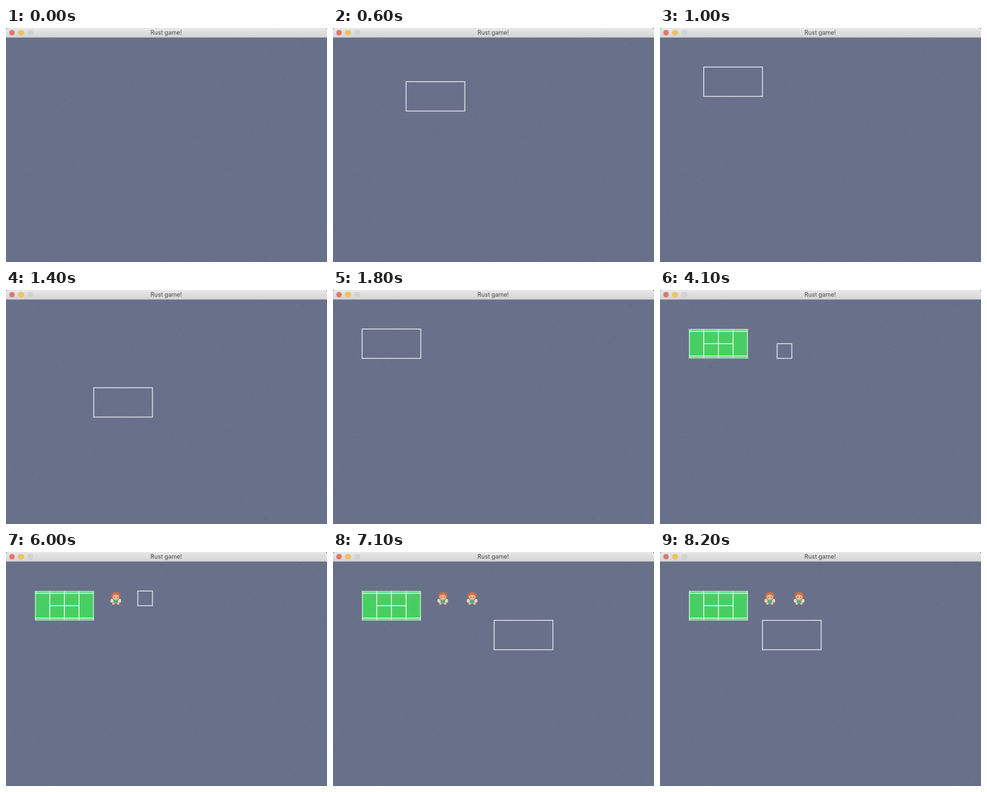
Animation of 480 by 350 pixels, one loop 8300 ms. Source, as an HTML page with a canvas:

```html
<!DOCTYPE html>
<html lang="en">
<head>
<meta charset="utf-8">
<title>Rust game!</title>
<style>
  html, body { margin: 0; width: 100%; height: 100%; overflow: hidden; background: #69718a; }
  #win { position: relative; width: 480px; height: 350px; overflow: hidden; }
  canvas { position: absolute; left: 0; top: 0; }
  #bar {
    position: absolute; left: 0; top: 0; width: 480px; height: 15px; box-sizing: border-box;
    background: linear-gradient(#e8e8e8, #d4d4d4); border-bottom: 1px solid #878b98;
    border-radius: 3px 3px 0 0;
    font: 8.9px/14px Inter, "Open Sans", sans-serif; color: #4a4a4a; text-align: center; text-indent: -1px;
  }
  #bar i {
    position: absolute; top: 2.7px; left: calc(4.7px + 13.7px * var(--n));
    width: 8.6px; height: 8.6px; border-radius: 50%;
  }
</style>
</head>
<body>
<div id="win">
  <canvas id="stage" width="480" height="350"></canvas>
  <div id="bar">
    <i style="--n:0;background:#e3766b"></i>
    <i style="--n:1;background:#edc25f"></i>
    <i style="--n:2;background:#d2d2d2"></i>
    Rust game!
  </div>
</div>
<script>
const LOOP = 8300, STEP = 100;
const CELL = 21.94, LEFT = 43.5, TOP = 58.4;
const ctx = document.getElementById('stage').getContext('2d');

// Each cursor visits stops: arrival time, column, row, glide time (none = jump)
const cursors = [
  { w: 4, h: 2, end: 2300, stops: [[200, 4, 2], [800, 0, 0, 300], [1000, 1, 0], [1400, 4, 4, 400], [1800, 0, 0, 300]] },
  { w: 1, h: 1, end: 5100, stops: [[3700, 6, 1], [4500, 5, 0, 200]] },
  { w: 1, h: 1, end: 6300, stops: [[5400, 6, 0], [5700, 7, 0]] },
  { w: 4, h: 2, end: LOOP, stops: [[7000, 9, 2], [7500, 6, 2], [7700, 5, 2]] }
];

const placed = [
  { at: 2300, paint: court, col: 0 },
  { at: 5100, paint: person, col: 5 },
  { at: 6300, paint: person, col: 7 }
];

const px = c => LEFT + c * CELL;
const py = r => TOP + r * CELL;

function box(color, x, y, w, h) {
  ctx.fillStyle = color;
  ctx.fillRect(x, y, w, h);
}

function oval(color, x, y, rx, ry) {
  ctx.fillStyle = color;
  ctx.beginPath();
  ctx.ellipse(x, y, rx, ry, 0, 0, 7);
  ctx.fill();
}

// Slate floor with faint seeded specks
function makeGround() {
  const layer = document.createElement('canvas');
  layer.width = 480;
  layer.height = 350;
  const g = layer.getContext('2d');
  g.fillStyle = '#69718a';
  g.fillRect(0, 0, 480, 350);
  let seed = 7;
  const rnd = () => (seed = seed * 16807 % 2147483647) / 2147483647;
  for (let i = 0; i < 900; i++) {
    g.fillStyle = `rgba(82,90,116,${rnd() * 0.35})`;
    g.fillRect(rnd() * 480, 15 + rnd() * 335, 2, 1);
  }
  return layer;
}

function court(x, y) {
  const w = 4 * CELL, h = 2 * CELL, line = 1.37, white = '#e6f7eb', pale = '#b4e9c2';
  box('#48cf63', x, y, w, h);
  for (let i = 1; i < 4; i++) box(white, x + i * CELL - line / 2, y, line, h);
  for (const [color, inset] of [[pale, 0], [white, 2 * line]]) {
    box(color, x, y + inset, w, line);
    box(color, x, y + h - inset - line, w, line);
  }
  box(white, x + CELL, y + CELL - line / 2, 2 * CELL, line);
  box(white, x, y, 1, h);
  box(white, x + w - 1, y, 1, h);
}

function person(x, y) {
  const hair = '#cb7049', skin = '#ebb890', pale = '#ecd2bb';
  const mid = x + CELL / 2;
  box(pale, mid - 5, y + 13, 10, 5);
  for (const side of [-1, 1]) {
    oval(pale, mid + side * 6, y + 14.5, 2, 2.8);
    box(skin, mid + side * 3.5 - 1.7, y + 17, 3.4, 3.4);
  }
  oval(hair, mid, y + 7.5, 6.8, 6.2);
  oval(skin, mid, y + 9.3, 4.8, 4);
  for (const side of [-1, 1]) box('#8a5748', mid + side * 2.3 - 0.6, y + 8.5, 1.2, 1.6);
  box('#4bae88', mid - 3.5, y + 13.5, 7, 4);
}

// Position on the grid, snapped to whole cells
function locate(stops, t) {
  let [, c, r] = stops[0];
  for (const [at, col, row, glide = 0] of stops) {
    if (t <= at - glide && t < at) break;
    const p = glide ? Math.min(1, (t - at + glide) / glide) : 1;
    c = Math.round(c + (col - c) * p);
    r = Math.round(r + (row - r) * p);
  }
  return [c, r];
}

const ground = makeGround();

function draw(t) {
  ctx.drawImage(ground, 0, 0);
  for (const { at, paint, col } of placed) {
    if (t >= at) paint(px(col), py(0));
  }
  for (const { w, h, end, stops } of cursors) {
    if (t < stops[0][0] || t >= end) continue;
    const [c, r] = locate(stops, t);
    ctx.strokeStyle = '#eceef3';
    ctx.lineWidth = 1.2;
    ctx.strokeRect(px(c), py(r), w * CELL, h * CELL);
  }
}

const start = performance.now();
function tick() {
  const t = (performance.now() - start) % LOOP;
  draw(Math.floor(t / STEP) * STEP);
  requestAnimationFrame(tick);
}
tick();
</script>
</body>
</html>
```
